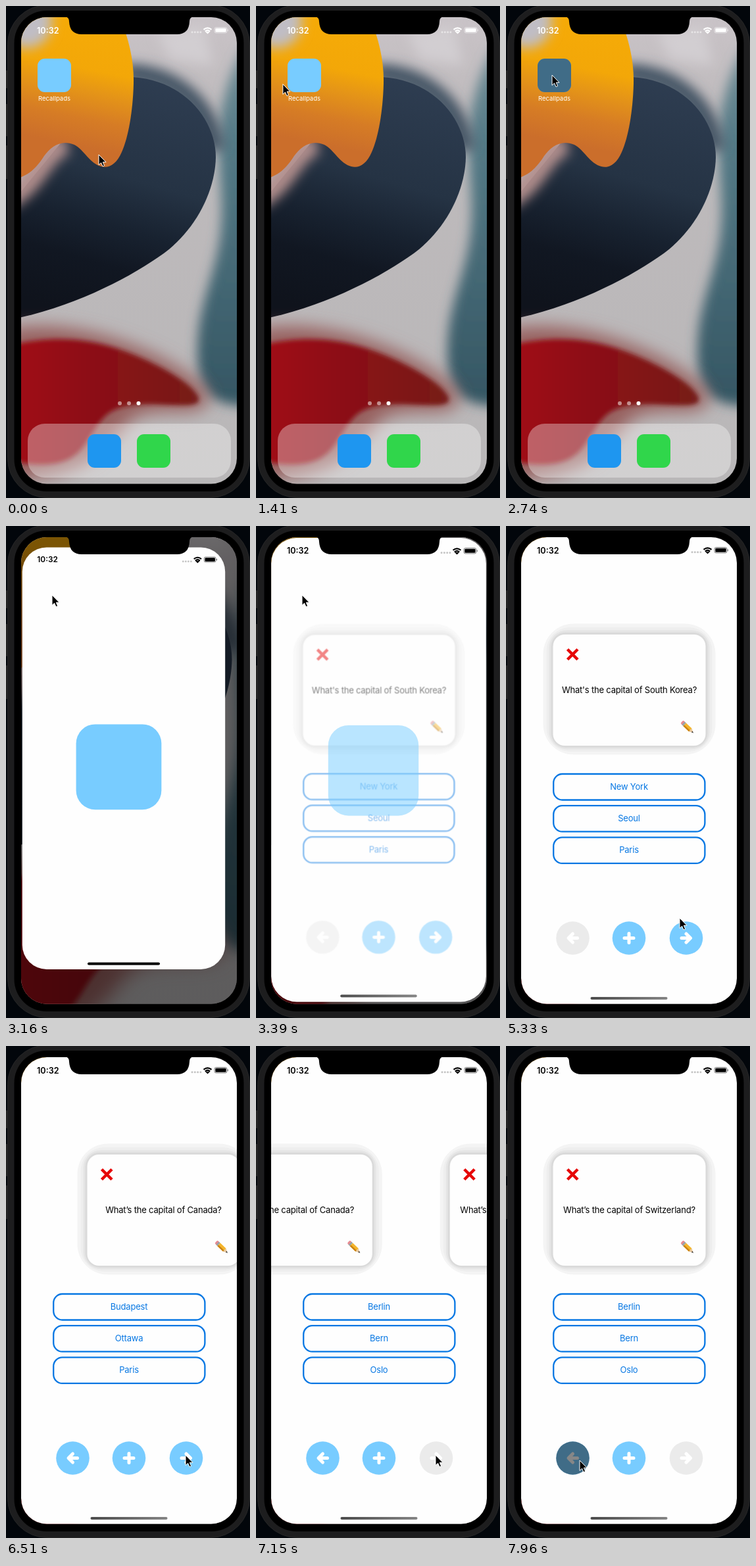
These frames come from a looping animation (371 px wide and 748 px high, 8 s). An HTML page:

```html
<!DOCTYPE html>
<html lang="en">
<head>
<meta charset="utf-8">
<title>Quiz app</title>
<style>
html, body { margin: 0; width: 100%; height: 100%; overflow: hidden; background: #02060b; }
svg { display: block; width: 371px; height: 748px; }
text { font-family: Inter, "Liberation Sans", sans-serif; font-size: 13px; letter-spacing: -.2px; text-anchor: middle; }
.time { font-size: 12.6px; font-weight: 600; letter-spacing: 0; text-anchor: start; }
.label { font-size: 9.5px; letter-spacing: 0; fill: #fff; }
.glyph { fill: none; stroke: #fff; stroke-width: 5; stroke-linecap: round; stroke-linejoin: round; }
</style>
</head>
<body>
<svg viewBox="0 0 371 748">
  <defs>
    <clipPath id="screen"><rect x="23" y="17" width="328" height="709.500" rx="39"/></clipPath>
    <clipPath id="window"><rect id="windowRect"/></clipPath>
    <filter id="crisp" x="-10%" y="-10%" width="120%" height="120%"><feGaussianBlur stdDeviation="3"/></filter>
    <filter id="soft" x="-30%" y="-30%" width="160%" height="160%"><feGaussianBlur stdDeviation="9"/></filter>
    <filter id="softer" x="-40%" y="-40%" width="180%" height="180%"><feGaussianBlur stdDeviation="13"/></filter>
    <linearGradient id="grey" x2="0" y2="1">
      <stop stop-color="#c9c3c7"/><stop offset=".2" stop-color="#bebabc"/><stop offset="1" stop-color="#b9b7b8"/>
    </linearGradient>
    <linearGradient id="teal" x2="0" y2="1">
      <stop stop-color="#78929a"/><stop offset=".3" stop-color="#547a86"/><stop offset="1" stop-color="#345562"/>
    </linearGradient>
    <linearGradient id="navy" x1=".7" y1="0" x2=".45" y2="1">
      <stop stop-color="#2e3d51"/><stop offset=".42" stop-color="#253344"/>
      <stop offset=".62" stop-color="#182230"/><stop offset=".78" stop-color="#111722"/><stop offset="1" stop-color="#0f131c"/>
    </linearGradient>
    <linearGradient id="orange" x1=".55" y1="0" x2=".4" y2="1">
      <stop stop-color="#f6ac07"/><stop offset=".34" stop-color="#f3a708"/>
      <stop offset=".46" stop-color="#e59517"/><stop offset=".62" stop-color="#d67c25"/><stop offset=".78" stop-color="#cb6e2b"/>
    </linearGradient>
    <linearGradient id="red">
      <stop stop-color="#a30b16"/><stop offset=".4" stop-color="#8e0d13"/><stop offset="1" stop-color="#761c1a"/>
    </linearGradient>
    <linearGradient id="bar"><stop stop-color="#4c4c4c"/><stop offset="1" stop-color="#858585"/></linearGradient>
  </defs>

  <rect x="0" y="98" width="4" height="27" fill="#222"/>
  <rect x="0" y="149" width="4" height="49" fill="#222"/>
  <rect x="0" y="212" width="4" height="51" fill="#222"/>
  <rect x="2.5" y="-1.5" width="368" height="749" rx="60" fill="#1d1d1e" stroke="#262627"/>
  <rect x="12.5" y="7" width="349" height="731" rx="49"/>

  <g clip-path="url(#screen)">
    <g id="wallpaper">
      <rect x="23" y="17" width="328" height="710" fill="url(#grey)"/>
      <path d="M230 40L300 30 315 90 250 80Z" fill="#d2ced1" filter="url(#soft)"/>
      <path d="M380 40C345 80 326 140 324 200S334 300 324 360 290 460 291 530 320 604 375 610Z" fill="url(#teal)" filter="url(#soft)"/>
      <path d="M180 102C255 100 314 155 318 220" fill="none" stroke="#435263" stroke-width="28" filter="url(#soft)"/>
      <path d="M0 310L90 200 180 108C265 106 319 170 319 230 318 285 285 343 240 376 190 412 100 460 0 478Z" fill="url(#navy)"/>
      <path d="M0 296C50 272 55 222 92 210" fill="none" stroke="#b28f8d" stroke-width="30" filter="url(#soft)"/>
      <path d="M0 0H165C185 40 195 80 194 118 193 160 186 200 176 222 168 241 156 247 145 244 128 240 118 218 104 211 84 202 68 214 58 228 44 250 30 262 0 266Z" fill="url(#orange)"/>
      <ellipse cx="32" cy="24" rx="38" ry="40" fill="#c0bdc4" filter="url(#soft)"/>
      <path d="M0 492C90 472 195 512 245 540S322 592 302 609 220 606 190 630 150 715 0 722Z" fill="#97605f" filter="url(#softer)"/>
      <path d="M0 518C60 501 120 504 172 522S282 572 292 594 240 602 200 606 150 620 132 648 100 712 0 690Z" fill="url(#red)" filter="url(#crisp)"/>
    </g>
    <g id="home">
      <rect x="33" y="635" width="309" height="82" rx="26" fill="#fff" opacity=".34"/>
      <g id="homeStatus"></g>
      <rect x="48" y="80" width="51" height="51" rx="11" fill="#78ccff"/>
      <rect id="iconPress" x="48" y="80" width="51" height="51" rx="11" opacity=".47"/>
      <text class="label" x="73.5" y="144">Recallpads</text>
      <g fill="#fff"><circle cx="173" cy="604" r="3" opacity=".5"/><circle cx="187" cy="604" r="3" opacity=".5"/><circle cx="201.500" cy="604" r="3"/></g>
      <rect x="124" y="651" width="51" height="51" rx="11" fill="#1e96f0"/>
      <rect x="199" y="651" width="51" height="51" rx="11" fill="#30d64b"/>
    </g>
    <rect id="dim" x="23" y="17" width="328" height="710"/>

    <g id="app" clip-path="url(#window)">
      <rect x="0" y="0" width="371" height="748" fill="#fefefe"/>
      <g id="content">
        <g id="appStatus"></g>
        <g id="quiz">
          <g id="cards"></g>
          <g id="options"></g>
          <g id="buttons"></g>
        </g>
        <rect id="splash" x="110" y="303" width="138" height="138" rx="31" fill="#78ccff"/>
      </g>
      <rect id="homeBar" height="4" rx="2"/>
      <rect id="cover" x="0" y="0" width="371" height="748" fill="#78ccff"/>
    </g>
  </g>

  <path d="M90 16Q96 17 96 24 97 43 115 43H260Q278 43 279 24 279 17 285 16Z"/>
  <path id="cursor" d="M0 0V15.500L3.600 12.300 6 17.800 8.600 16.700 6.300 11.300H11Z" stroke="#fff" stroke-width="1"/>
</svg>

<script>
const $ = id => document.getElementById(id);
const set = (el, attrs) => { for (const k in attrs) el.setAttribute(k, attrs[k]); };
const clamp = x => Math.min(1, Math.max(0, x));
const ramp = (t, start, length) => clamp((t - start) / length);
const smooth = u => u * u * (3 - 2 * u);
const mix = (a, b, p) => a + (b - a) * p;
const between = (t, a, b) => t >= a && t < b;

const LOOP = 8000, BLUE = '#78ccff', OFF = '#ebebeb';
const CARD_STEP = 350;
const quizzes = [
  ["What's the capital of South Korea?", 'New York', 'Seoul', 'Paris'],
  ['What’s the capital of Canada?', 'Budapest', 'Ottawa', 'Paris'],
  ['What’s the capital of Switzerland?', 'Berlin', 'Bern', 'Oslo'],
];
const buttonX = [101.5, 187, 274];
const glyphs = ['M7 0H-6M0 -6.500L-6.500 0 0 6.500', 'M-7 0H7M0 -7V7', 'M-7 0H6M0 -6.500L6.500 0 0 6.500'];

// Pointer path: time, x, y
const path = [
  [480, 141, 226], [740, 112, 202], [1000, 70, 163], [1240, 40, 138],
  [1300, 39, 136], [1480, 42, 108], [1650, 56, 89], [1800, 80, 87], [1930, 98, 106], [2050, 85, 130],
  [2110, 80, 131], [2300, 68, 120], [2510, 70, 105],
  [4580, 70, 105], [4800, 110, 225], [5080, 214, 470], [5330, 264, 596],
  [5450, 264, 596], [5630, 273, 622],
  [7240, 273, 622], [7420, 215, 631], [7600, 127, 632], [7720, 112, 630],
];

function status(color, dots) {
  return `<text class="time" x="47" y="41.500" fill="${color}">10:32</text>
    <g fill="${dots}">${[283, 287.3, 291.6, 295.9].map(x => `<circle cx="${x}" cy="39.800" r="1.500"/>`).join('')}</g>
    <g fill="none" stroke="${color}" stroke-width="2.200">
      <path d="M300.500 35.800Q306.500 30.800 312.500 35.800M302.800 38.500Q306.500 35.300 310.200 38.500"/>
      <path d="M305.300 39.800L306.500 41 307.700 39.800Z"/>
      <rect x="317" y="32.500" width="19" height="8.500" rx="2.500" stroke-width="1" opacity=".5"/>
    </g>
    <rect x="318.300" y="33.800" width="16.400" height="6" rx="1.300" fill="${color}"/>
    <rect x="336.800" y="35.300" width="1.200" height="3" rx=".6" fill="${color}" opacity=".5"/>`;
}

function card([question]) {
  const rings = [[15, 46, '#f4f4f4'], [10, 36, '#eeeeee'], [6, 27, '#e5e5e5'], [3, 22, '#dadada'], [0, 18, '#fefefe']];
  const rect = ([grow, radius, fill]) => `<rect x="${71.5 - grow}" y="${165 - grow * 1.1}" width="${232 + 2 * grow}"
    height="${169 + 2 * grow}" rx="${radius}" fill="${fill}"/>`;
  return `<g>${rings.map(rect).join('')}
    <path d="M93.500 187.500L109 203M109 187.500L93.500 203" stroke="#e60505" stroke-width="4.500"/>
    <text x="187.500" y="254">${question}</text>
    <g transform="translate(276 306) rotate(44)">
      <rect x="-12" y="-3.200" width="5" height="6.400" rx="2" fill="#e88a91"/>
      <rect x="-9" y="-3.200" width="3" height="6.400" fill="#9aa3a8"/>
      <rect x="-6" y="-3.200" width="12" height="6.400" fill="#f4b52c"/>
      <path d="M-6 2H6" stroke="#c98214" stroke-width="2.400"/>
      <path d="M6 -3.200L12 0 6 3.200Z" fill="#e8c79b"/>
      <path d="M9.500 -1.300L12.500 0 9.500 1.300Z" fill="#333"/>
    </g></g>`;
}

$('homeStatus').innerHTML = status('#fff', '#ffffff80');
$('appStatus').innerHTML = status('#000', '#c4c4c4');
$('cards').innerHTML = quizzes.map(card).join('');
$('options').innerHTML = [0, 1, 2].map(i => `<g transform="translate(0 ${i * 48.2})">
  <rect x="72.200" y="377" width="230.200" height="39.500" rx="13.500" fill="#fefefe" stroke="#0677e3" stroke-width="2.300"/>
  <text x="187" y="401" fill="#0677e3"></text></g>`).join('');
$('buttons').innerHTML = buttonX.map((x, i) => `<g transform="translate(${x} 626.500)">
  <circle r="25.300"/><path class="glyph" d="${glyphs[i]}"/><circle class="press" r="25.300" opacity=".47"/></g>`).join('');

const cards = [...$('cards').children];
const answers = document.querySelectorAll('#options text');
const discs = document.querySelectorAll('#buttons g > circle:first-child');
const presses = document.querySelectorAll('.press');

function pointer(t) {
  const i = path.findIndex(k => k[0] > t);
  if (i === 0) return path[0].slice(1);
  if (i < 0) return path[path.length - 1].slice(1);
  const a = path[i - 1], b = path[i], p = ramp(t, a[0], b[0] - a[0]);
  return [mix(a[1], b[1], p), mix(a[2], b[2], p)];
}

function drawOpening(t) {
  const open = t >= 2850;
  const s = Math.max(0, t - 2850) * .0139;
  const p = t > 3600 ? 1 : 1 - (1 + s) * Math.exp(-s);
  const width = mix(51, 328, p), height = mix(51, 710, p ** 1.5);
  const x = mix(73.5, 187, p) - width / 2, y = mix(105.5, 372, p) - height / 2;
  const scale = width / 328, fade = ramp(t, 3250, 290);
  const show = (id, on) => set($(id), { visibility: on ? 'visible' : 'hidden' });

  show('app', open);
  show('iconPress', between(t, 2740, 2850));
  set($('wallpaper'), { transform: `translate(187 372) scale(${1 + .2 * p}) translate(-187 -372)` });
  set($('home'), { opacity: clamp(1 - 2 * p) });
  set($('dim'), { opacity: .53 * p });
  set($('windowRect'), { x, y, width, height, rx: mix(11, 39, p) });
  set($('content'), { transform: `translate(${x} ${y}) scale(${scale}) translate(-23 -17)` });
  set($('homeBar'), {
    x: x + 105.5 * scale, y: y + height - 11 * scale, width: 117 * scale,
    fill: t < 3300 ? '#000' : 'url(#bar)',
  });
  set($('cover'), { opacity: 1 - ramp(t, 2850, 120) });
  set($('splash'), { opacity: 1 - fade });
  set($('quiz'), { opacity: fade });
}

function drawQuiz(t) {
  const slides = [6100, 6930];
  const position = slides.reduce((sum, start) => sum + smooth(ramp(t, start, 543)), 0);
  const current = slides.filter(start => t >= start).length;
  cards.forEach((el, i) => set(el, { transform: `translate(${CARD_STEP * (i - position)} 0)` }));
  answers.forEach((el, i) => { el.textContent = quizzes[current][i + 1]; });
  const enabled = [current > 0, true, current < 2];
  discs.forEach((el, i) => set(el, { fill: enabled[i] ? BLUE : OFF }));
  const pressed = [t >= 7960, false, between(t, 5980, 6100) || between(t, 6810, 6930)];
  presses.forEach((el, i) => set(el, { visibility: pressed[i] ? 'inherit' : 'hidden' }));
}

const begin = performance.now();
function frame() {
  const t = (performance.now() - begin) % LOOP;
  drawOpening(t);
  drawQuiz(t);
  set($('cursor'), { transform: `translate(${pointer(t).join(' ')})` });
  requestAnimationFrame(frame);
}
frame();
</script>
</body>
</html>
```
